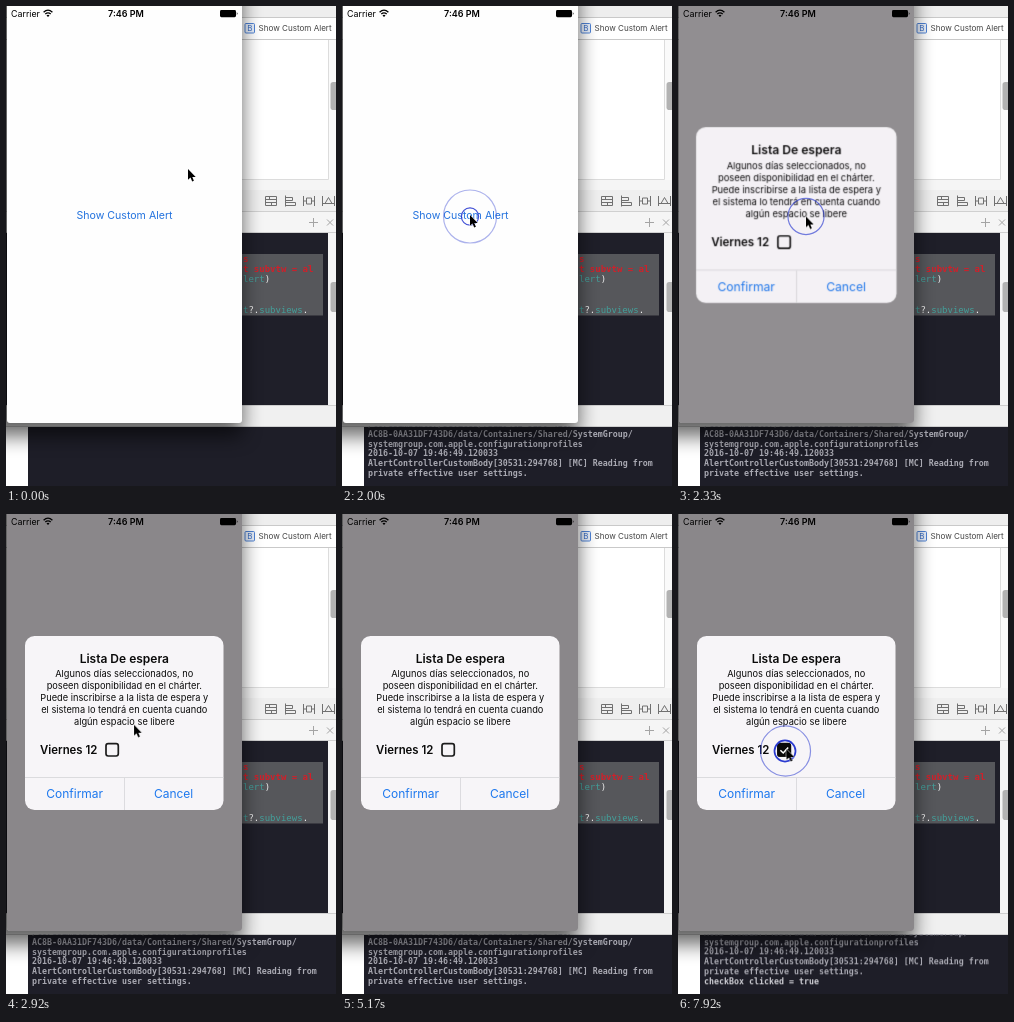
An HTML page for the animation above (8000 ms loop, 330 px wide and 480 px high).

```html
<!DOCTYPE html>
<html lang="es">
<head>
<meta charset="utf-8">
<title>Custom alert</title>
<style>
html, body { margin: 0; width: 100%; height: 100%; overflow: hidden; background: #fff; }
svg { display: block; width: 330px; height: 480px; font-family: Inter, "Open Sans", sans-serif; }
.mono { font-family: "DejaVu Sans Mono", monospace; white-space: pre; }
.mid { text-anchor: middle; }
.semi { font-weight: 600; }
.line { fill: none; stroke: #707070; }
.shadow { filter: blur(10px); opacity: .6; }

/* every part shares one 8 s clock */
.button, .dim, .alert, .log, .added, .tick, .ring, .cursor {
  animation: 8s linear infinite;
}

.button { animation-name: press; fill: #2473de; }
@keyframes press {
  0%, 15.4% { fill: #2473de; }
  16%, 21.8% { fill: #cae0f8; }
  24%, 25.2% { fill: #2473de; }
  27%, 100% { fill: #767b84; }
}

.dim { animation-name: dim; fill: #080208; }
@keyframes dim {
  0%, 25.1% { opacity: 0; }
  27.125% { opacity: .27; }
  29.125% { opacity: .44; }
  30.25%, 100% { opacity: .47; }
}

.alert { animation-name: present; transform-origin: 118px 209px; }
@keyframes present {
  0%, 25.1% { opacity: 0; transform: scale(1.2); }
  27.125% { opacity: .62; transform: scale(1.09); }
  29.125% { opacity: .97; transform: scale(1.01); }
  30.25%, 100% { opacity: 1; transform: scale(1); }
}

.log { animation-name: log; animation-timing-function: step-end; }
@keyframes log {
  0% { opacity: 0; transform: translateY(0); }
  24% { opacity: 1; transform: translateY(0); }
  96.25%, 100% { opacity: 1; transform: translateY(-9.7px); }
}

.added, .tick { animation-name: appear; animation-timing-function: step-end; }
@keyframes appear {
  0% { opacity: 0; }
  96.25%, 100% { opacity: 1; }
}

.ring { fill: none; stroke: #2b3bd0; stroke-width: 1.2; opacity: 0; }
.down1 { animation-name: down1; }
.up1 { animation-name: up1; }
.down2 { animation-name: down2; }
.up2 { animation-name: up2; stroke-width: 1.7; }
@keyframes down1 {
  0%, 15.5% { r: 0; opacity: 0; }
  15.6% { r: .7px; opacity: 1; }
  21% { r: 16px; opacity: .8; }
  27.125% { r: 32px; opacity: .17; }
  28.7%, 100% { r: 36px; opacity: 0; }
}
@keyframes up1 {
  0%, 22.4% { r: 0; opacity: 0; }
  22.5% { r: 1px; opacity: 1; }
  27.125% { r: 15px; opacity: .8; }
  29.125% { r: 18px; opacity: .65; }
  35.6%, 100% { r: 36px; opacity: 0; }
}
@keyframes down2 {
  0%, 90% { r: 0; opacity: 0; }
  90.1% { r: .5px; opacity: 1; }
  95% { r: 14px; opacity: .9; }
  99% { r: 25px; opacity: .55; }
  100% { r: 27.5px; opacity: .45; }
}
@keyframes up2 {
  0%, 95.1% { r: 0; opacity: 0; }
  95.2% { r: .5px; opacity: 1; }
  99% { r: 10.5px; opacity: 1; }
  100% { r: 13px; opacity: .95; }
}

.cursor { animation-name: wander; animation-timing-function: ease-in-out; }
@keyframes wander {
  0%, 1% { transform: translate(182px, 163px); }
  8.4%, 10.4% { transform: translate(136px, 205px); }
  13.5%, 25% { transform: translate(128px, 209px); }
  27.1%, 36.2% { transform: translate(128px, 210.5px); }
  45.9% { transform: translate(131px, 347.5px); }
  47.8%, 50% { transform: translate(132px, 341.5px); }
  52.1%, 53.2% { transform: translate(107px, 403px); }
  56.25%, 58.4% { transform: translate(54.5px, 463px); }
  62.5%, 63.8% { transform: translate(153.5px, 477px); }
  64.6% { transform: translate(156px, 483px); }
  69% { transform: translate(156px, 483px); animation-timing-function: ease-out; }
  79.1% { transform: translate(111px, 237px); }
  82.2% { transform: translate(109px, 235px); }
  86.5%, 100% { transform: translate(108.5px, 235px); }
}
</style>
</head>
<body>
<svg viewBox="0 0 330 480">
  <defs>
    <clipPath id="consoleArea"><path d="M22 420H330V480H22Z"/></clipPath>
    <clipPath id="editorArea"><path d="M236 227H322V399H236Z"/></clipPath>
  </defs>

  <!-- editor panes -->
  <rect width="330" height="480" fill="#fff"/>
  <rect y="0" width="330" height="12" fill="#eeeeee"/>
  <path d="M0 11.5H330M0 33.5H330" stroke="#c9c9c9"/>
  <rect x="239" y="17.5" width="9.5" height="9.5" rx="1" fill="#eaf1fc" stroke="#4f83d6"/>
  <text class="mid" x="243.8" y="25.2" font-size="8" fill="#3b70c8">B</text>
  <text x="252.5" y="25" font-size="8.07" fill="#444">Show Custom Alert</text>
  <rect x="322" y="34" width="8" height="140" fill="#fafafa"/>
  <path d="M236 173.5H322.5V34" fill="none" stroke="#dcdcdc"/>
  <rect y="174" width="330" height="53" fill="#f5f5f5"/>
  <rect y="184" width="330" height="21" fill="#efefef"/>
  <path d="M0 205.5H330M0 226.5H330" stroke="#d0d0d0"/>
  <g class="line">
    <path d="M259.5 190.5H270.5V199.5H259.5ZM259.5 193.5H270.5M259.5 196.5H270.5M263.5 190.5V193.5M265.5 196.5V199.5"/>
    <path d="M279.5 189.5V200.5M279.5 191.5H286.5V194.5H279.5M279.5 196.5H289.5V199.5H279.5"/>
    <path d="M297.5 190V200M308.5 190V200M297.5 195H300.5M305.5 195H308.5M300.5 192H305.5V198H300.5Z"/>
    <path d="M316.5 190V200M328.5 190V200M316.5 197.5H319L322.5 191.5L326 197.5H328.5M319 197.5H326"/>
  </g>
  <path d="M303 216.5H312M307.5 212V221M321 213.5L327 219.5M327 213.5L321 219.5" stroke="#a4a4a4"/>

  <rect y="227" width="322" height="172" fill="#1f1f29"/>
  <rect x="322" y="227" width="8" height="172" fill="#f4f4f4"/>
  <g fill="#b2b2b2">
    <rect x="324.5" y="76" width="8" height="28" rx="2.8"/>
    <rect x="324.5" y="276" width="8" height="30" rx="2.8"/>
  </g>
  <g clip-path="url(#editorArea)">
    <rect x="230" y="248" width="87" height="61.5" fill="#56575b"/>
    <g class="mono" font-size="9" fill="#43a09b">
      <g fill="#d0202a" font-weight="700">
        <text x="237" y="256">s</text>
        <text x="237" y="266">t subvtw = al</text>
      </g>
      <text x="237" y="276.3">lert<tspan fill="#eee">)</tspan></text>
      <text x="237" y="307">t<tspan fill="#eee">?.</tspan>subviews<tspan fill="#eee">.</tspan></text>
    </g>
  </g>
  <rect y="399" width="330" height="22" fill="#f0f0f0"/>
  <path d="M0 399.5H330M0 420.5H330" stroke="#cfcfcf"/>

  <!-- console -->
  <rect x="22" y="421" width="308" height="59" fill="#1e1e28"/>
  <rect y="421" width="22" height="59" fill="#fff"/>
  <g clip-path="url(#consoleArea)">
    <g class="log mono" font-size="8.3" font-weight="700" fill="#a9a9b2">
      <text x="26" y="421.3">/CoreSimulator/Devices/7B1E94C2-51D0-4E6F-</text>
      <text x="26" y="431">AC8B-0AA31DF743D6/data/Containers/Shared/SystemGroup/</text>
      <text x="26" y="440.7">systemgroup.com.apple.configurationprofiles</text>
      <text x="26" y="450.4">2016-10-07 19:46:49.120033</text>
      <text x="26" y="460.1">AlertControllerCustomBody[30531:294768] [MC] Reading from</text>
      <text x="26" y="469.8">private effective user settings.</text>
      <text class="added" x="26" y="479.5" fill="#d0d0d6">checkBox clicked = true</text>
    </g>
  </g>

  <!-- phone window -->
  <rect class="shadow" x="-30" y="-30" width="266" height="460"/>
  <path d="M1 -20H236V414Q236 417 233 417H4Q1 417 1 414Z" fill="#fefefe"/>
  <text class="button mid" x="118.5" y="213" font-size="10.6">Show Custom Alert</text>
  <path class="dim" d="M1 0H236V414Q236 417 233 417H4Q1 417 1 414Z"/>
  <g fill="#000">
    <text x="5" y="10.8" font-size="8.85">Carrier</text>
    <text class="mid semi" x="120" y="10.8" font-size="9">7:46 PM</text>
    <g fill="none" stroke="#000" stroke-width="1.3">
      <path d="M37.6 6.2Q42 2 46.4 6.2M39.3 8.1Q42 5.6 44.7 8.1"/>
    </g>
    <path d="M40.5 9.4Q42 8.2 43.5 9.4L42 11Z"/>
    <rect x="214" y="4" width="16" height="7.2" rx="1.4"/>
    <path d="M230.8 6Q232.4 7.6 230.8 9.2Z"/>
  </g>

  <g class="alert" fill="#0a0a0a">
    <rect x="19" y="122" width="198.5" height="174" rx="9.5" fill="#f7f5f8"/>
    <text class="mid semi" x="118.3" y="149" font-size="12">Lista De espera</text>
    <g class="mid" font-size="9.25">
      <text x="118.3" y="163.4">Algunos días seleccionados, no</text>
      <text x="118.3" y="175.3">poseen disponibilidad en el chárter.</text>
      <text x="118.3" y="187.2">Puede inscribirse a la lista de espera y</text>
      <text x="118.3" y="199.1">el sistema lo tendrá en cuenta cuando</text>
      <text x="118.3" y="211">algún espacio se libere</text>
    </g>
    <text class="semi" x="34" y="239.8" font-size="11.4">Viernes 12</text>
    <rect x="100" y="229.7" width="12.3" height="12.3" rx="2.2" fill="none" stroke="#1c1c1c" stroke-width="1.7"/>
    <g class="tick">
      <rect x="99.2" y="228.9" width="13.9" height="13.9" rx="2.6"/>
      <path d="M102.4 236.2L105.2 239L110.2 233.4" fill="none" stroke="#fff" stroke-width="1.5"/>
    </g>
    <path d="M19 263.5H217.5M118.5 264V296" stroke="#d5d5d8" stroke-width=".8"/>
    <g class="mid" font-size="12" fill="#1d78ee">
      <text x="68.7" y="284.2">Confirmar</text>
      <text x="167.6" y="284.2">Cancel</text>
    </g>
  </g>

  <!-- pointer -->
  <circle class="ring down1" cx="128" cy="210.5"/>
  <circle class="ring up1" cx="128" cy="210.5"/>
  <circle class="ring down2" cx="107.5" cy="237"/>
  <circle class="ring up2" cx="107" cy="237"/>
  <path class="cursor" d="M0 0V10.8L2.5 8.5L4.2 12.4L5.9 11.7L4.3 7.9H7.7Z" stroke="#fff" stroke-width=".9" paint-order="stroke"/>
</svg>
</body>
</html>
```
